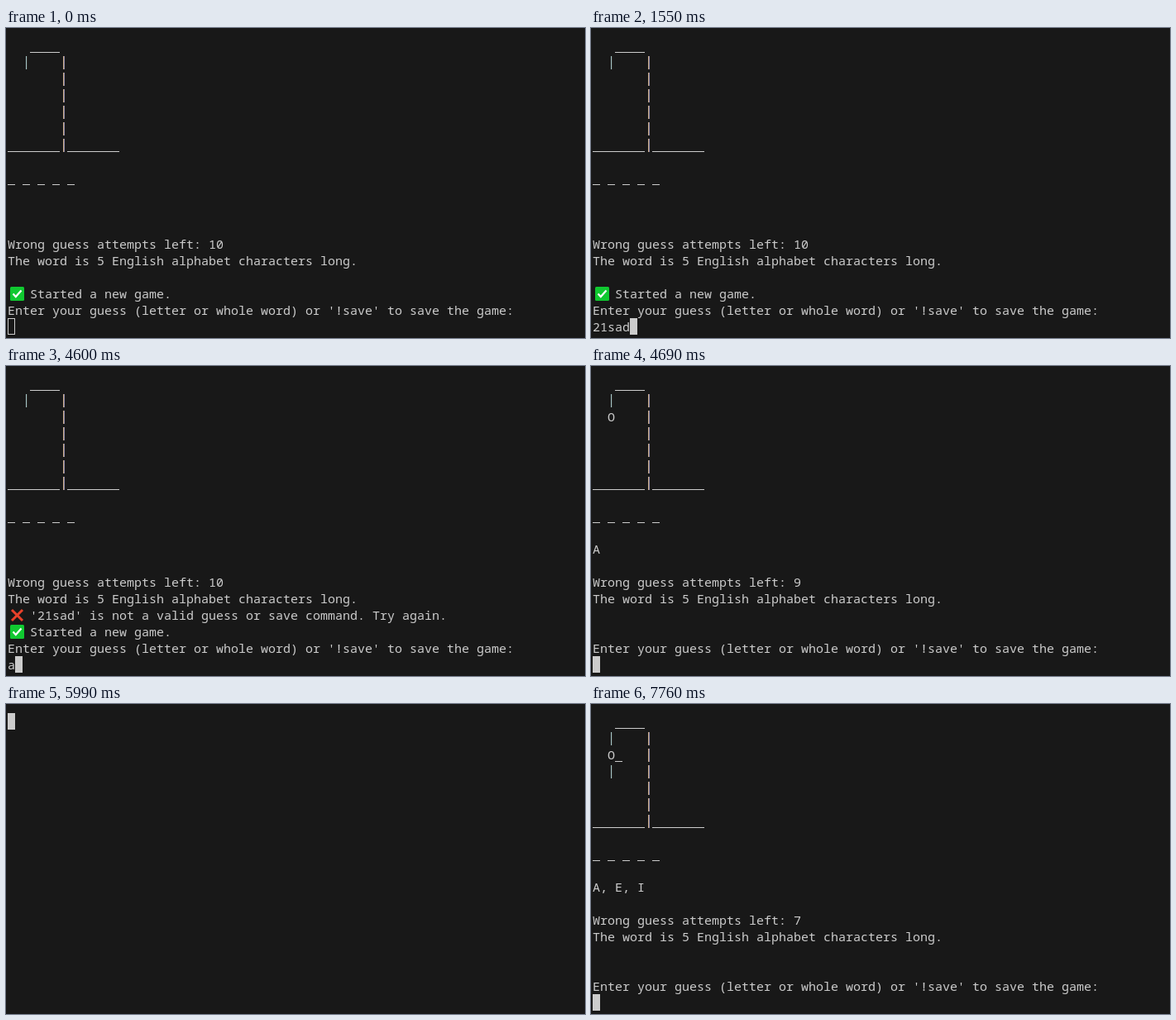
Recreate the animation shown at these times as an HTML page with a canvas. Size 700 by 375 pixels, loop 8 s.

```html
<!DOCTYPE html>
<html lang="en">
<head>
<meta charset="utf-8">
<title>Hangman in a terminal</title>
<style>
  html, body { margin: 0; width: 100%; height: 100%; overflow: hidden; background: #181818; }
  canvas { display: block; width: 700px; height: 375px; }
</style>
</head>
<body>
<canvas id="screen" width="700" height="375"></canvas>
<script>
const ctx = document.getElementById('screen').getContext('2d', { alpha: false });
const LOOP = 8000;
const CELL = 9, ROW = 20, LEFT = 2, TOP = 11;
const BG = '#181818', FG = '#cccccc';

// Game screens; the input line is typed separately.
const start = { left: 10, guessed: '', head: '', body: '', started: true };
const rejected = { ...start, error: "'21sad' is not a valid guess or save command. Try again." };
const missA = { left: 9, guessed: 'A', head: 'O', body: '' };
const missE = { left: 8, guessed: 'A, E', head: 'O', body: '|' };
const missI = { left: 7, guessed: 'A, E, I', head: 'O_', body: '|' };

// time, screen (null = cleared), typed input
const steps = [
  [0, start, ''],
  [1120, start, '21'],
  [1390, start, '21sa'],
  [1550, start, '21sad'],
  [2010, rejected, ''],
  [4600, rejected, 'a'],
  [4690, missA, ''],
  [5710, missA, 'e'],
  [5990, null, ''],
  [6080, missE, ''],
  [7480, missE, 'i'],
  [7760, missI, '']
];

const cellX = col => LEFT + col * CELL;
const rowY = row => TOP + row * ROW;

function rect(x, y, w, h, color) {
  ctx.fillStyle = color;
  ctx.fillRect(x, y, w, h);
}

function bar(col, y) {
  // Two columns imitate subpixel text rendering.
  const x = cellX(col) + 4;
  const [a, b] = col === 2 ? ['#a5c6c8', '#33302c'] : ['#c9ab86', '#8a86a8'];
  rect(x, y + 3, 1, 16, a);
  rect(x + 1, y + 3, 1, 16, b);
}

function print(row, text, col = 0) {
  const y = rowY(row);
  [...text].forEach((ch, i) => {
    const x = cellX(col + i);
    if (ch === '_') rect(x, y + 18, CELL, 1, FG);
    else if (ch === '|') bar(col + i, y);
    else if (ch !== ' ') {
      ctx.fillStyle = FG;
      ctx.fillText(ch, x, y + 16);
    }
  });
}

function stroke(points, color, width) {
  ctx.strokeStyle = color;
  ctx.lineWidth = width;
  ctx.beginPath();
  points.forEach(([x, y], i) => i ? ctx.lineTo(x, y) : ctx.moveTo(x, y));
  ctx.stroke();
}

function checkMark(row) {
  const y = rowY(row);
  ctx.fillStyle = '#10c830';
  ctx.beginPath();
  ctx.roundRect(5, y + 2, 17, 17, 1.5);
  ctx.fill();
  stroke([[8.5, y + 10.5], [11.8, y + 14], [18.5, y + 6.5]], '#ffffff', 2.2);
}

function crossMark(row) {
  const y = rowY(row);
  stroke([[7, y + 4], [20, y + 17]], '#e8412a', 3);
  stroke([[20, y + 4], [7, y + 17]], '#e8412a', 3);
}

function cursor(col, row, focused) {
  const x = cellX(col), y = rowY(row);
  rect(x, y, CELL, ROW, FG);
  if (!focused) rect(x + 1, y + 1, CELL - 2, ROW - 2, BG);
}

function drawGame(game) {
  print(0, '____', 3);
  print(1, '|', 2);
  for (let row = 1; row < 6; row++) print(row, '|', 7);
  print(2, game.head, 2);
  print(3, game.body, 2);
  print(6, '_______|_______');
  print(8, '_ _ _ _ _');
  print(10, game.guessed);
  print(12, 'Wrong guess attempts left: ' + game.left);
  print(13, 'The word is 5 English alphabet characters long.');
  if (game.error) {
    crossMark(14);
    print(14, game.error, 3);
  }
  if (game.started) {
    checkMark(15);
    print(15, 'Started a new game.', 3);
  }
  print(16, "Enter your guess (letter or whole word) or '!save' to save the game:");
}

function draw(time) {
  const [, game, typed] = steps.filter(([at]) => at <= time).pop();
  rect(0, 0, 700, 375, BG);
  ctx.font = '15px "Noto Sans Mono", "DejaVu Sans Mono", monospace';
  ctx.textBaseline = 'alphabetic';
  if (!game) return cursor(0, 0, true);
  drawGame(game);
  print(17, typed);
  cursor(typed.length, 17, time >= 370);
}

const origin = performance.now();
function tick() {
  draw((performance.now() - origin) % LOOP);
  requestAnimationFrame(tick);
}
tick();
</script>
</body>
</html>
```
